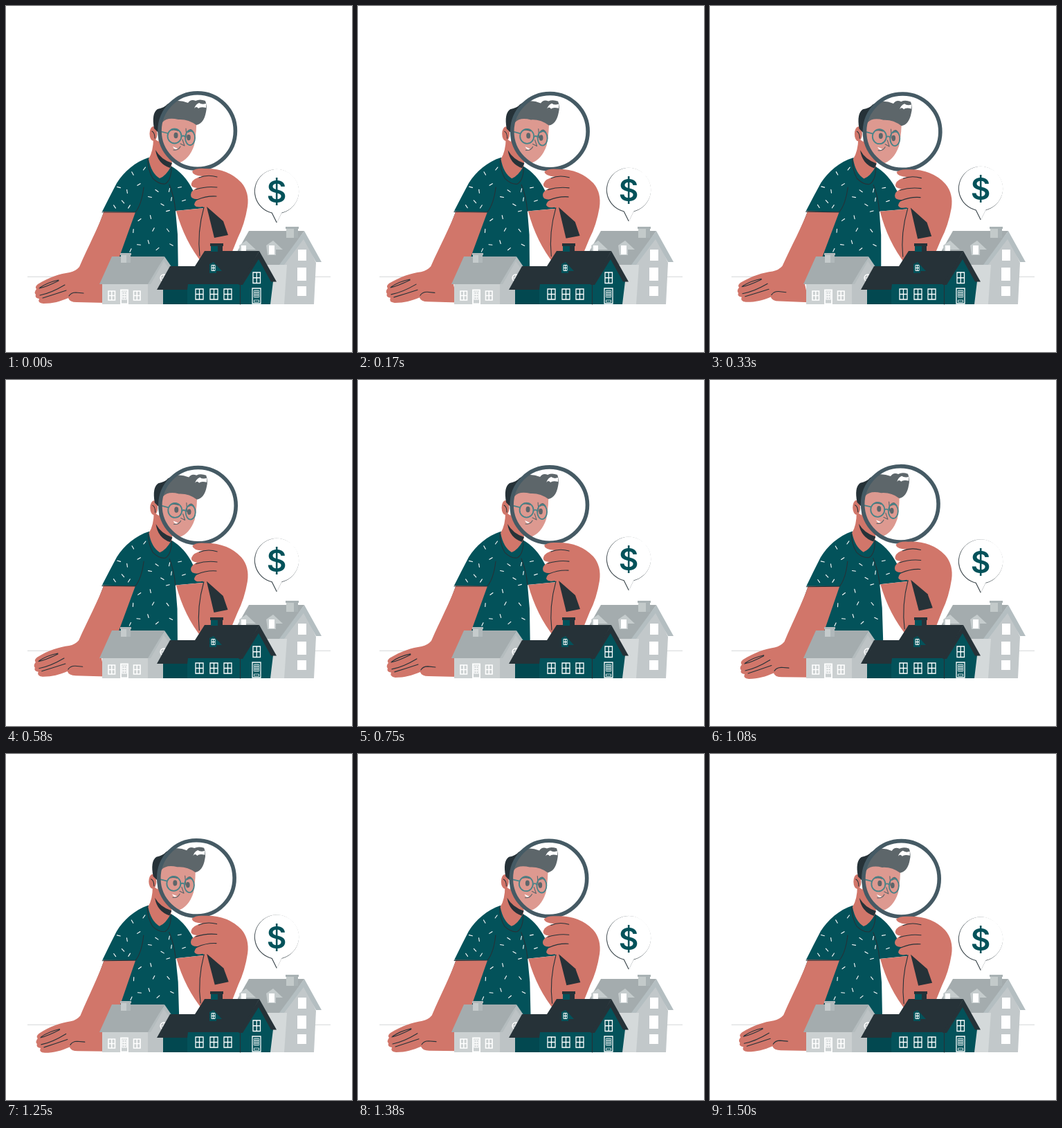
An HTML page for the animation above (1540 ms loop, 500 px wide and 500 px high).

```html
<!DOCTYPE html>
<html lang="en">
<head>
<meta charset="utf-8">
<style>
  html, body { margin: 0; width: 100%; height: 100%; overflow: hidden; background: #fff; }
  svg { display: block; width: 100vw; height: 100vh; }
  .skin { fill: #d1766a; }
  .teal { fill: #03525a; }
  .dark { fill: #263238; }
  .roof { fill: #a4acae; }
  .ink { fill: none; stroke: #263238; stroke-width: 1.1; stroke-linecap: round; stroke-linejoin: round; }
  .dollar { font: 600 44px Inter, sans-serif; text-anchor: middle; }
</style>
</head>
<body>
<svg viewBox="0 0 500 500">
  <defs>
    <path id="balloon" d="M384 299A31.7 31.7 0 1 1 398 299L391 313Z"/>
  </defs>
  <path d="M31 391.3H469" stroke="#c9cdcf" stroke-width=".8"/>

  <g id="person">
    <path class="dark" d="M142 296L136 312 128 331 141 311Z"/>
    <!-- resting arm -->
    <path class="skin" d="M142 296C133 321 120 345 106 377Q101 383 92 385C78 387 62 392 46 402Q41 406 44 409Q40 414 43 417Q41 422 48 423Q45 429 54 430C68 430 78 427 90 422Q92 428 102 428L145 429 139 403Q155 385 165 362L188 297Z"/>
    <path class="ink" d="M49 407Q61 399 76 396M49 418Q65 415 85 403M53 422Q69 417 87 411M91 419Q94 414 101 414L112 415M48 408Q58 406 76 397"/>
    <!-- shirt -->
    <path class="teal" d="M206 219C187 225 170 240 160 256Q150 275 139 297L187 298 164 362 164 390H249L248 330 245 296 287 292 270 266Q258 242 238 231Z"/>
    <path class="ink" d="M199 262Q196 287 187 298H139M236 258Q243 275 245 296" stroke-width=".8"/>
    <g id="specks" stroke="#fff" stroke-width="1.1" stroke-linecap="round"/>
    <!-- neck and head -->
    <path class="skin" d="M213 191Q213 210 206 221Q210 242 222 249Q231 246 239 231L242 210Z"/>
    <path class="dark" d="M216 208Q224 222 240 227L237 234Q219 228 216 208Z"/>
    <path class="ink" d="M205 221Q205 237 212 249Q221 258 230 257Q239 252 239 232"/>
    <path class="skin" d="M222 160H275Q276 180 272 201Q265 222 249 227Q229 224 220 203Z"/>
    <ellipse class="skin" cx="213" cy="184.500" rx="5.500" ry="10.500"/>
    <path class="ink" d="M211 181Q215 183 215 191" stroke-width=".7"/>
    <path class="dark" d="M214 177Q210 155 219 149Q229 147 233 142Q246 133 263 140Q267 134 274 137Q280 134 288 137Q291 145 289 153Q286 170 275 172Q263 163 249 164Q233 160 226 168Q222 174 220 183Z"/>
    <path fill="#fff" d="M272 148Q274 142 279 140Q283 143 289 141L289 147Q281 145 278 148Q275 144 272 148Z"/>
    <path class="dark" d="M236 181Q241 174 250 179L249 181Q242 178 236 181ZM262 181Q267 174 272 183Q267 180 263 183Z"/>
    <ellipse class="dark" cx="245.500" cy="187" rx="3" ry="4.200"/>
    <ellipse class="dark" cx="264" cy="190" rx="2.800" ry="4.200"/>
    <path class="ink" d="M260 177L261 190M255 193L258 202 252 199M242 208Q249 209 252 203" stroke-width="1.200"/>
    <path fill="#fff" d="M241 203L248 206Q244 209 241 203Z"/>
    <g fill="none" stroke="#0b5960" stroke-width="1.800">
      <ellipse cx="243.500" cy="188" rx="10" ry="10.500"/>
      <ellipse cx="266" cy="190.500" rx="7" ry="10.500"/>
      <path d="M222 181L234 184M253 189Q256 186 259 189"/>
    </g>
    <!-- magnifier and hand -->
    <circle cx="276.700" cy="180.500" r="54.700" fill="#fff" fill-opacity=".25" stroke="#455a64" stroke-width="5.600"/>
    <path class="skin" d="M246 296L287 292 284 290Q274 292 272 287Q273 281 279 279Q267 280 267 273Q267 267 276 263Q266 262 268 256Q270 249 284 246Q270 245 269 239Q274 234 287 235Q320 234 340 255Q352 269 349 290Q345 315 335 335L320 372H284Q258 340 246 296Z"/>
    <path class="dark" d="M290 290L314 311 321 331 301 335Z"/>
    <path class="ink" d="M305 247Q291 243 279 248M305 262Q290 260 274 265M304 275Q290 274 276 280M286 291Q276 327 280 361"/>
  </g>

  <g id="bubble">
    <use href="#balloon" fill="#263238" stroke="#263238" stroke-width=".6"/>
    <use href="#balloon" fill="#fff" transform="translate(.6 -.5)"/>
    <text class="teal dollar" x="391" y="284.500">$</text>
  </g>

  <g id="backHouse">
    <path fill="#d8dadb" d="M345 352H400V431H345Z"/>
    <path fill="#c2c8ca" d="M382 374H397L430 332 448 371 445 431H382Z"/>
    <path fill="#d4d9da" d="M382 374H406L402 431H382Z"/>
    <path class="roof" d="M351 325H431L397 374H366L334 355Z"/>
    <path fill="#b4bec1" d="M431 325L456 370H448L430 337 402 374H395Z"/>
    <path fill="#c3caca" d="M405 319H422V335H405Z"/>
    <path fill="#a9b2b4" d="M416 322H422V335H416ZM404 319H423V322H404Z"/>
    <path fill="#c5cccd" d="M337 346L347 339 361 352H347V355H338ZM376 346L386 339 400 352H390V360H378Z"/>
    <path fill="#fff" d="M340 346H347V354H340ZM380 346H388V359H380ZM422 352H434V368H422ZM421 378H434V397H421ZM421 405H434V419H421Z"/>
  </g>

  <g id="leftHouse">
    <path fill="#cbd0d1" d="M139 400H207V431H139Z"/>
    <path fill="#bdc3c5" d="M205 402L228 366 245 392V431H205Z"/>
    <path class="roof" d="M153 362H229L207 402H135Z"/>
    <path fill="#b4bcbe" d="M229 362L244 384H239L228 369 209 402H205Z"/>
    <path fill="#c5cbcc" d="M166 357H180V371H166Z"/>
    <path fill="#b0b8ba" d="M174 360H180V371H174ZM165 357H181V360H165Z"/>
    <circle cx="228" cy="393" r="5" fill="none" stroke="#fff" stroke-width="1.300"/>
    <path d="M223 393H233M228 388V398" stroke="#fff"/>
  </g>

  <g id="mainHouse">
    <path fill="#024850" d="M227 405H264V431H227Z"/>
    <path class="teal" d="M262 400H340V431H262ZM338 402L366 358 386 398 382 431H338Z"/>
    <path class="dark" d="M237 376H273L287 354H366L339 402H263L262 410H218Z"/>
    <path class="dark" d="M366 354L391 398.500H383L365 366 342 403H336Z"/>
    <path class="ink" d="M338.500 403V431" stroke-width=".8"/>
    <path class="teal" d="M296 345H313V355H296Z"/>
    <path class="dark" d="M295 343H314V347H295ZM306 345H313V355H306Z"/>
    <path class="teal" d="M294 373L300 370 312 383H304V386H294Z"/>
  </g>
  <g id="windows" fill="none" stroke="#fff"/>
</svg>
<script>
  const LOOP = 1540;
  const $ = id => document.getElementById(id);

  // Framed pane grid, optionally filled
  function pane(x, y, w, h, cols, rows, line = 1.3) {
    let d = `M${x} ${y}h${w}v${h}h${-w}z`;
    for (let i = 1; i < cols; i++) d += `M${x + w * i / cols} ${y}v${h}`;
    for (let i = 1; i < rows; i++) d += `M${x} ${y + h * i / rows}h${w}`;
    return `<path d="${d}" stroke-width="${line}"/>`;
  }
  $('windows').innerHTML =
    [274, 295, 315].map(x => pane(x, 409, 11, 15, 2, 2)).join('') +
    pane(357, 385, 10.5, 15.5, 2, 2) + pane(297, 374.5, 5, 8, 2, 2, 1) +
    pane(356, 408, 12, 22, 1, 1) + pane(358.5, 411, 7, 10, 3, 3, 0.8) +
    pane(358.5, 425, 7, 3, 1, 1, 0.8) +
    [148, 184.5].map(x => pane(x, 412, 9.5, 13, 2, 2, 1.6)).join('') +
    pane(166, 410.5, 10, 20, 1, 1, 1.8) + pane(168, 413, 6, 11, 2, 3, 1.2);

  const specks = [
    [183, 242], [200, 235], [163, 262], [175, 268], [192, 258], [218, 267], [236, 266],
    [251, 262], [157, 290], [178, 290], [208, 276], [209, 305], [193, 309], [226, 287],
    [239, 279], [234, 296], [234, 324], [213, 323], [192, 345], [206, 341], [219, 351],
    [239, 345], [184, 325], [257, 281], [169, 283], [180, 353]
  ];
  $('specks').innerHTML = specks.map(([x, y], i) =>
    `<path d="M-2.5 0H2.5" transform="translate(${x} ${y}) rotate(${i * 67 + 60})"/>`).join('');

  function draw(now) {
    const p = now % LOOP / LOOP;
    const sway = p < 0.25 ? 4 * p : p < 0.75 ? 2 - 4 * p : 4 * p - 4;
    const lift = 9.5 * (1 - Math.abs(1 - 2 * p));
    $('person').setAttribute('transform', `rotate(${sway} 196 277)`);
    $('bubble').setAttribute('transform', `translate(0 ${-lift})`);
    requestAnimationFrame(draw);
  }
  draw(performance.now());
</script>
</body>
</html>
```
